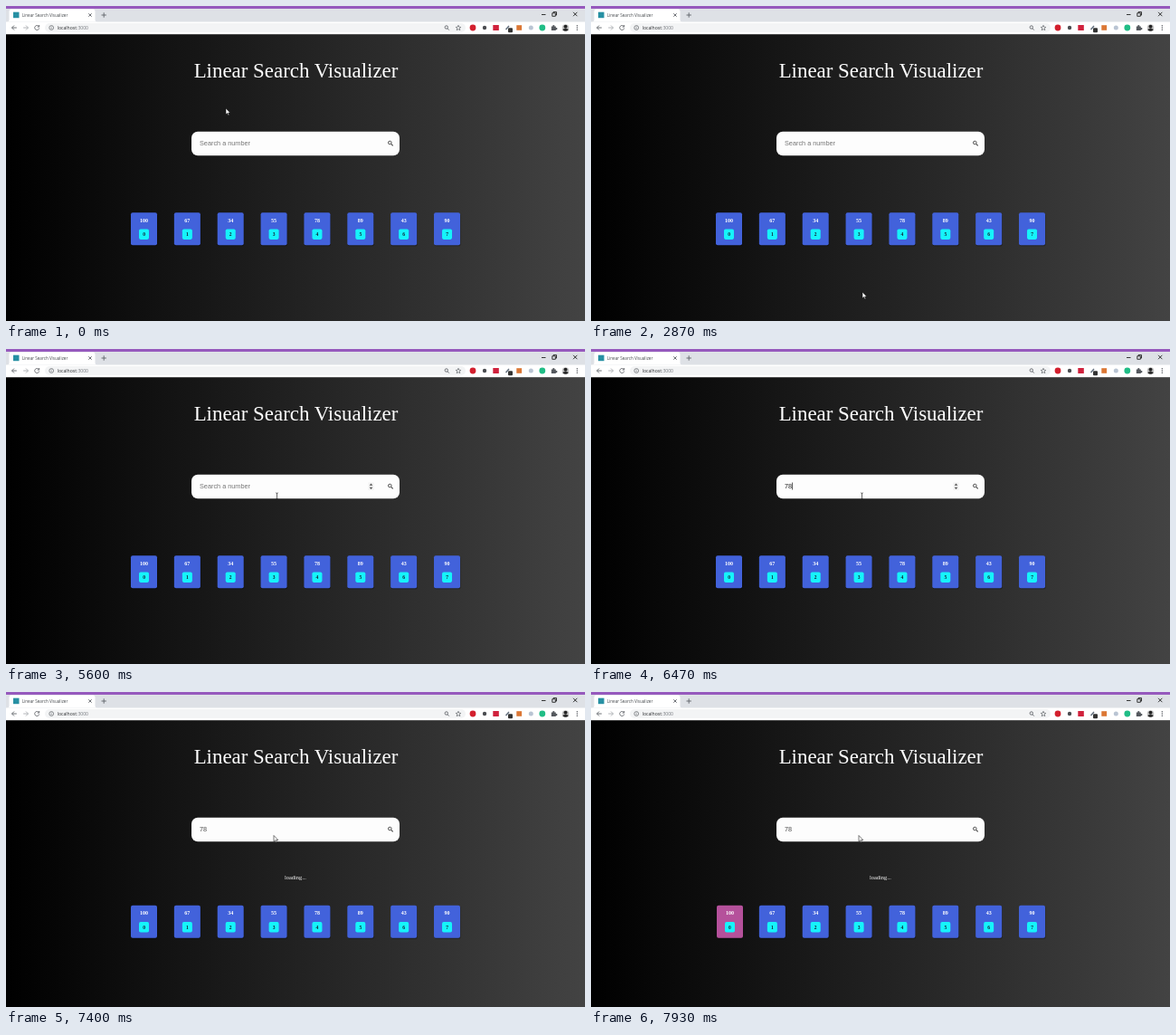
Recreate the animation shown at these times as an HTML page. Size 640 by 348 pixels, loop 8 s.

```html
<!DOCTYPE html>
<html lang="en">
<head>
<meta charset="utf-8">
<title>Linear Search Visualizer</title>
<style>
  html, body { margin: 0; width: 100%; height: 100%; overflow: hidden; background: #000; }
  svg { display: block; width: 100vw; height: 100vh; }
  text { white-space: pre; }
  .ui { font-family: "Open Sans", sans-serif; }
  .field { font-family: "Liberation Sans", Arial, sans-serif; font-size: 7.3px; }
  .serif { font-family: "Liberation Serif", "Times New Roman", serif; fill: #fff; }
  .card text { font-weight: bold; text-anchor: middle; }
  .line { fill: none; stroke: #5f6368; stroke-width: .9; }
</style>
</head>
<body>
<svg viewBox="0 0 640 348" preserveAspectRatio="none">
  <defs>
    <linearGradient id="bg"><stop offset="0" stop-color="#000"/><stop offset="1" stop-color="#434343"/></linearGradient>
    <clipPath id="face"><circle cx="618.5" cy="24" r="3.8"/></clipPath>
  </defs>

  <!-- browser window -->
  <rect width="640" height="18" fill="#dee1e6"/>
  <rect width="640" height="3" fill="#9659bd"/>
  <path d="M1 17.5Q3.500 17.500 3.500 15V6Q3.500 3.500 6 3.500H96Q98.500 3.500 98.500 6V15Q98.500 17.500 101 17.500Z" fill="#fff"/>
  <rect x="8" y="6.700" width="6.500" height="6.500" fill="#2790a3"/>
  <text class="ui" x="17.700" y="11.800" font-size="4.600" fill="#45494d">Linear Search Visualizer</text>
  <path class="line" d="M91.300 8.300l3.400 3.400m0-3.400l-3.400 3.400M105.500 10h5.400M108.200 7.300v5.400"/>
  <path class="line" stroke-width=".8" style="stroke:#222" d="M592 9.500h4.500M603.800 7.800h3.500v3.500h-3.500zM605 7.800v-1.200h3.500v3.500h-1.200M627 6.800l4.400 4.400m0-4.400l-4.400 4.400"/>

  <rect y="17.500" width="640" height="14" fill="#fff"/>
  <rect x="43" y="19" width="465" height="10" rx="5" fill="#f3f4f5"/>
  <path class="line" d="M11.800 24H6.500m2.500-2.500L6.500 24 9 26.500"/>
  <path class="line" style="stroke:#aaadb1" d="M19.200 24h5.300M22 21.500l2.500 2.500-2.500 2.500"/>
  <path class="line" d="M36.300 22.600a2.500 2.500 0 1 0 .4 1.900M36.700 21v2h-2"/>
  <circle class="line" cx="50.200" cy="24" r="2.400" style="stroke-width:.7"/>
  <path class="line" style="stroke-width:.7" d="M50.200 23.700v1.600M50.200 22.500v.6"/>
  <text class="ui" x="56.700" y="25.900" font-size="5.100" fill="#2b2d30">localhost<tspan fill="#74787d">:3000</tspan></text>
  <circle class="line" cx="486.800" cy="23.500" r="1.700"/>
  <path class="line" d="M488 24.800l1.800 1.800"/>
  <path class="line" style="stroke-width:.7" d="M500 21.300l.8 1.900 2 .2-1.500 1.300.5 2-1.800-1.100-1.800 1.100.5-2-1.500-1.300 2-.2z"/>

  <!-- toolbar buttons -->
  <circle cx="516" cy="24" r="3.400" fill="#d3202e"/>
  <circle cx="529" cy="24" r="2.200" fill="#4a4c50"/>
  <rect x="538.300" y="21" width="6.500" height="6" fill="#d0213c"/>
  <path d="M552.500 26l3.500-4" stroke="#667280" stroke-width="1.500"/>
  <rect x="555" y="24.300" width="5" height="5" rx="1" fill="#333"/>
  <rect x="564.300" y="21.200" width="5.800" height="5.600" fill="#db7734"/>
  <circle cx="580.300" cy="24" r="2.500" fill="#b9c4d3"/>
  <circle cx="592.800" cy="24" r="3.400" fill="#20bd86"/>
  <path d="M602.800 22.500h1.500a1.100 1.100 0 1 1 2 0h1.500v1.600a1.100 1.100 0 1 1 0 1.900v1h-5z" fill="#55595e"/>
  <g clip-path="url(#face)">
    <rect x="614" y="20" width="9" height="9" fill="#c5c5c5"/>
    <circle cx="618.500" cy="22.800" r="2" fill="#252525"/>
    <ellipse cx="618.500" cy="28" rx="3.800" ry="3" fill="#252525"/>
  </g>
  <g fill="#55595e"><circle cx="631.300" cy="21.700" r=".7"/><circle cx="631.300" cy="24" r=".7"/><circle cx="631.300" cy="26.300" r=".7"/></g>

  <!-- page -->
  <rect y="31.500" width="640" height="316.500" fill="url(#bg)"/>
  <text class="serif" x="320.500" y="79" font-size="22.900" text-anchor="middle">Linear Search Visualizer</text>
  <rect x="205" y="138.700" width="230" height="26.500" rx="7" fill="#fdfdfd"/>
  <text id="entry" class="field" x="214" y="154.200"></text>
  <path id="caret" d="M214.500 147.500v8" stroke="#222" stroke-width=".8"/>
  <g id="spinner">
    <rect x="400.500" y="147.500" width="6" height="8.500" fill="#f1f1f1"/>
    <path d="M401.700 150.800l1.800-2.200 1.800 2.200zM401.700 152.700l1.800 2.200 1.800-2.200z" fill="#505050"/>
  </g>
  <circle class="line" cx="424.300" cy="151" r="1.800" style="stroke:#444"/>
  <path class="line" style="stroke:#444;stroke-width:1.100" d="M425.600 152.300l2.100 2.100"/>
  <text id="loading" class="serif" x="308" y="207" font-size="6.400">loading...</text>
  <g id="cards"></g>

  <path id="arrow" d="M0 0V6.800L1.600 5.400 2.700 7.800 3.700 7.300 2.700 5H4.800Z" fill="#fff" stroke="#111" stroke-width=".55"/>
  <path id="beam" d="M-1.300-3.500H-.4L0-3 .4-3.500H1.300M0-3V3M-1.300 3.500H-.4L0 3 .4 3.500H1.300" fill="none" stroke="#222" stroke-width=".7"/>
</svg>
<script>
const LOOP = 8000, HOVER = 3350, FOCUS = 3600, KEY1 = 5950, KEY2 = 6200, SUBMIT = 6600, VISIT = 7480;
const BLINK = 530;
const BLUE = [66, 98, 219], PINK = [181, 81, 155];
const values = [100, 67, 34, 55, 78, 89, 43, 90];
// time, x, y
const path = [
  [330, 243, 113], [1130, 251, 127], [1670, 265, 147], [2070, 267, 150],
  [2530, 300, 316], [2870, 300, 316], [3650, 299.5, 162.5]
];

const $ = id => document.getElementById(id);
const show = (id, on) => $(id).setAttribute("visibility", on ? "visible" : "hidden");
const move = (el, x, y) => el.setAttribute("transform", `translate(${x} ${y})`);

$("cards").innerHTML = values.map((v, i) => `
  <g class="card">
    <rect x=".6" y=".8" width="29" height="36.500" rx="2" fill="#000" opacity=".25"/>
    <rect class="face" width="29" height="36" rx="2"/>
    <text class="serif" x="14.500" y="10.700" font-size="6">${v}</text>
    <rect x="9" y="18.300" width="11" height="11.400" rx="1.800" fill="#16f3fa"/>
    <text class="serif" x="14.500" y="25.900" font-size="5.500" style="fill:#123">${i}</text>
  </g>`).join("");
const cards = [...document.querySelectorAll(".card")];
const faces = [...document.querySelectorAll(".face")];

function pointer(t) {
  if (t <= path[0][0]) return path[0].slice(1);
  const i = path.findIndex(p => p[0] > t);
  if (i < 0) return path[path.length - 1].slice(1);
  const [t0, x0, y0] = path[i - 1], [t1, x1, y1] = path[i];
  const u = (t - t0) / (t1 - t0), e = u * u * (3 - 2 * u);
  return [x0 + (x1 - x0) * e, y0 + (y1 - y0) * e];
}

function draw(t) {
  const sent = t >= SUBMIT;
  const typed = t < KEY1 ? "" : t < KEY2 ? "7" : "78";
  $("entry").textContent = typed || "Search a number";
  $("entry").setAttribute("fill", sent ? "#4c4c4c" : typed ? "#222" : "#757575");

  const since = t - (t >= KEY2 ? KEY2 : t >= KEY1 ? KEY1 : FOCUS);
  show("caret", t >= FOCUS && !sent && since % (2 * BLINK) < BLINK);
  move($("caret"), typed.length * 4.06, 0);
  show("spinner", t >= HOVER && !sent);
  show("loading", sent);

  const inField = t >= HOVER && !sent;
  const [x, y] = sent ? [296, 158.5] : pointer(t);
  show("beam", inField);
  show("arrow", !inField);
  move($(inField ? "beam" : "arrow"), x, y);

  const mix = Math.max(0, Math.min(1, (t - VISIT) / 450));
  const shake = t < VISIT ? 0 : -Math.cos((t - 7670) / 260 * 3 * Math.PI);
  cards.forEach((card, i) => {
    const c = i ? BLUE : BLUE.map((b, k) => Math.round(b + (PINK[k] - b) * mix));
    move(card, 138 + i * 47.86 + (i ? 0 : shake), sent ? 235.8 : 228.2);
    faces[i].setAttribute("fill", `rgb(${c})`);
  });
}

const start = performance.now();
function tick() {
  draw((performance.now() - start) % LOOP);
  requestAnimationFrame(tick);
}
draw(0);
requestAnimationFrame(tick);
</script>
</body>
</html>
```
